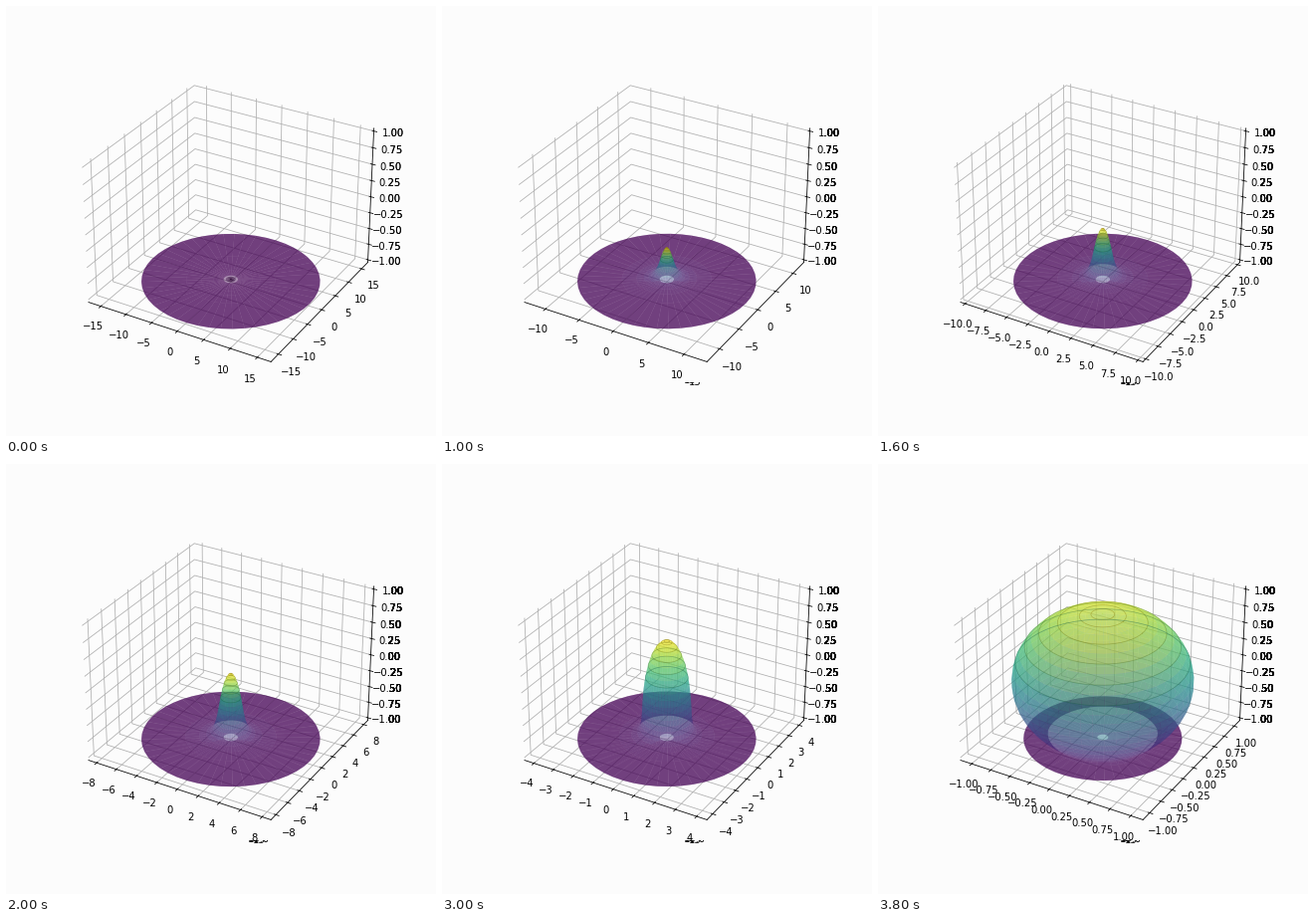
Animation of 432 by 432 pixels, one loop 4000 ms. Source, as a matplotlib script:

```python
import numpy as np
import matplotlib.pyplot as plt
from matplotlib.animation import FuncAnimation
from matplotlib.ticker import MaxNLocator
from matplotlib.transforms import Bbox, TransformedBbox

FRAMES, STEP = 20, 200
PAD = 25 / 24          # panes reach a little past the limits
BG = "#fcfcfc"
RINGS = (1, 2, 4, 6, 8, 10)

plt.rcParams.update({"font.family": "DejaVu Sans", "font.size": 10})

theta = np.linspace(0, np.pi, 25)
phi = np.linspace(0, 2 * np.pi, 50)
# stereographic radius; the tiny term keeps the south pole finite
flat = np.sin(theta) / (1 + np.cos(theta) + 1e-16)
cmap = plt.get_cmap("viridis")
locator = MaxNLocator(9, steps=[1, 2, 2.5, 5, 10])

fig = plt.figure(figsize=(6, 6), dpi=72, facecolor=BG)
fig.subplots_adjust(left=0.125, right=0.9, bottom=0.125, top=0.88)
ax = fig.add_subplot(projection="3d", facecolor=BG)


def profile(t):
    """Radius and height along a meridian, plane (0) to sphere (1)."""
    r = (1 - t) * flat + t * np.sin(theta)
    z = (t - 1) + t * np.cos(theta)
    return r, z


def draw_scene(i):
    t = i / FRAMES
    r, z = profile(t)
    ax.clear()
    ax.plot_surface(np.outer(r, np.cos(phi)), np.outer(r, np.sin(phi)),
                    np.outer(z, np.ones_like(phi)), cmap=cmap, alpha=0.5,
                    rstride=1, cstride=1, linewidth=0)
    for k in RINGS:
        level = (1 + np.cos(theta[k])) / 2 if t else 0.0
        shade = 0.6 * np.array(cmap(level)[:3])
        ax.plot(r[k] * np.cos(phi), r[k] * np.sin(phi), np.full_like(phi, z[k]),
                color=shade, alpha=0.5, lw=0.7, zorder=10)

    view = 1.1 * r.max()
    ticks = [v for v in locator.tick_values(-view, view) if abs(v) <= view]
    ax.set_xticks(ticks)
    ax.set_yticks(ticks)
    ax.set_zticks(np.arange(-4, 5) / 4)
    ax.set_xlim(-view * PAD, view * PAD)
    ax.set_ylim(-view * PAD, view * PAD)
    ax.set_zlim(-PAD, PAD)
    for axis in (ax.xaxis, ax.yaxis, ax.zaxis):
        axis.set_pane_color((1, 1, 1, 0))


def label_specs(axis):
    to_fig = ax.transData - fig.transFigure
    specs = []
    for tick in axis.get_major_ticks():
        lab = tick.label1
        x, y = to_fig.transform(lab.get_position())
        specs.append((x, y, lab.get_text(), lab.get_ha(), lab.get_va()))
    return specs


# Only the axes square is wiped between frames, so labels pile up beyond it.
trails = []
for i in range(FRAMES):
    draw_scene(i)
    fig.draw_without_rendering()
    low = [s for s in label_specs(ax.xaxis) if s[1] < 0.16]
    trails.append((low, label_specs(ax.zaxis)))

square = ax.get_position()
below = TransformedBbox(Bbox([[0, 0], [1, square.y0]]), fig.transFigure)
beside = TransformedBbox(Bbox([[square.x1, 0], [1, 1]]), fig.transFigure)


def draw_trail(trail):
    for specs, clip in zip(trail, (below, beside)):
        for x, y, text, ha, va in specs:
            label = fig.text(x, y, text, ha=ha, va=va, clip_on=True)
            label.set_clip_box(clip)


def update(i):
    for label in list(fig.texts):
        label.remove()
    draw_scene(i)
    for trail in trails[:1] + trails[:i]:
        draw_trail(trail)
    return []


anim = FuncAnimation(fig, update, frames=FRAMES, init_func=lambda: [],
                     interval=STEP, repeat=True, repeat_delay=0, blit=False)
plt.show()
```
